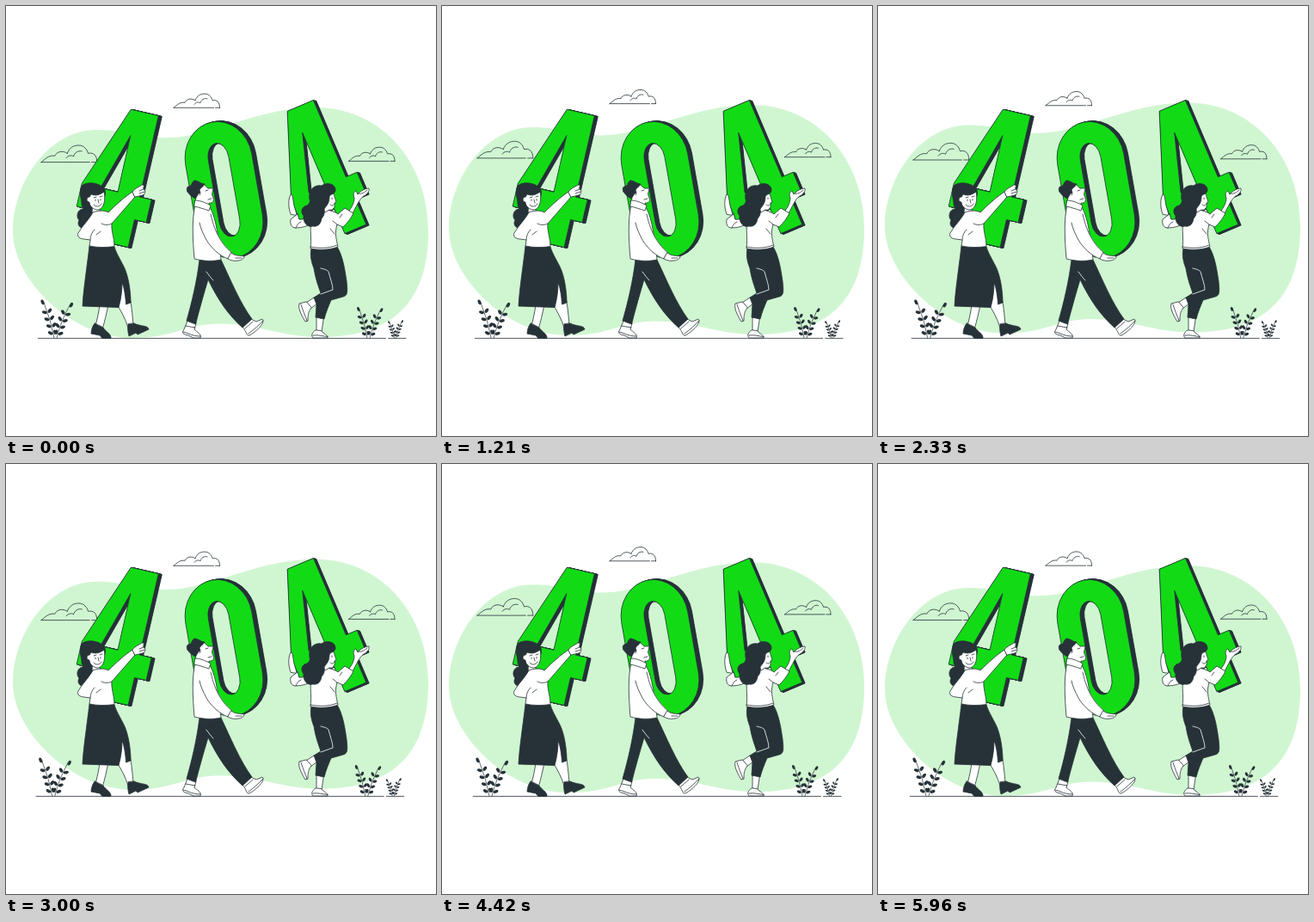
Recreate the animation shown at these times as an HTML page with a canvas. Size 500 px wide and 500 px high, loop 6 s.

```html
<!DOCTYPE html>
<html lang="en">
<head>
<meta charset="utf-8">
<title>404</title>
<style>
html, body { margin: 0; width: 100%; height: 100%; overflow: hidden; background: #fff; }
canvas { display: block; width: 500px; height: 500px; }
</style>
</head>
<body>
<canvas id="stage"></canvas>
<script>
const LOOP = 6000;
const GREEN = '#12db15', PALE = '#d0f6d1', DARK = '#263238', WHITE = '#fff';
const canvas = document.getElementById('stage');
const ctx = canvas.getContext('2d');
const dpr = window.devicePixelRatio || 1;
canvas.width = canvas.height = 500 * dpr;

const BLOB = new Path2D(`M8,262 C8,205 50,144 105,144 C150,144 170,160 215,150
  C265,139 305,118 360,118 C435,118 491,180 491,262 C491,338 456,385 365,385
  C320,385 295,369.500 248,369.500 C210,369.500 195,386 147,386 C76,386 8,318 8,262Z`);

const CLOUD = new Path2D(`M0,0 C4,-3 7,-7 13,-6 C15,-10.500 21,-11.500 25,-8.500
  M25,-8.500 C27,-14 31,-16.200 36,-16.200 C41,-16.200 44,-12.500 45,-8.500
  C50,-9.500 53.600,-7 53.500,0 M0,0 H46.500 M48.500,0 H53.500
  M24,-4 C26,-6.500 29,-7 31,-5.500 C32,-9 35,-11.500 39,-10.500`);

const FOUR = new Path2D(`M-32.500,0 L0,0 L0,97 L14,97 L14,124 L0,124 L0,157 L-27,157
  L-27,124 L-69,124 L-69,97Z M-26.500,30 L-47,97 L-26.500,97Z`);

const ZERO = new Path2D();
ZERO.roundRect(-39, -80, 78, 160, { x: 39, y: 44 });
ZERO.roundRect(-12, -55, 24, 110, { x: 12, y: 18 });

// [path, fill, stroke]
const people = [];
const add = (d, fill = WHITE, stroke = DARK) => people.push([new Path2D(d), fill, stroke]);
const line = (d, stroke = DARK) => add(d, null, stroke);

function womanWithSkirt() {
  add('M109,347 C108,356 106,364 104,372 L112,376 C115,366 117,357 119,347Z');
  add('M129,347 C134,355 139,364 142,374 L148,371 C147,360 146,345 142,330 L134,322Z');
  add('M103,369 C100,373 99,378 99,381 L109,383 L112,386.500 H122 C122.500,381 116,379 113,374Z', DARK);
  add('M142,370 C141,375 142,380 143,384 L151,380 L153,382 L166,376 C165,371 157,373 149,369Z', DARK);
  add('M97,279 C94,305 90,330 89,349 L131,350.500 C134,340 135,330 135,321 C138,330 139,338 139.500,347 L145,345 C145,330 142,313 137,303 C132,293 128,287 126,280Z', DARK);
  add('M99,236 C104,243 101,256 93,258 C86,260 82,254 85,249 C81,245 83,237 89,236 C92,233 96,233 99,236Z', DARK);
  add('M88,209 C95,203 109,206 114,212 C117,217 115,222 113,224 L99,236 C94,238 88,236 88,230 C88,224 84,217 88,209Z', DARK);
  add('M101,230 L100,240 C103,242 107,242 109,239 L109,232Z');
  add('M99,219 C104,221 109,220 114,216 C116,225 114,236 107,237 C101,237 97,232 97,228 C93,228 93,222 97,222Z');
  line('M104,225 v1.500 M110,224.500 v1.500 M107,225 L108,229 M102,231 C104,234 109,234 111,230 M102,223 L105,222 M109,222 L112,221');
  add('M101,240 C97,248 89,255 84,264 C82,268 86,271 91,271 L98,272 L97,279 C106,281 117,281 126,279.500 C126,270 122,260 123,253 L150,222 L147,216 C138,222 128,231 119,240 C114,237 106,238 101,240Z');
  line('M98,272 C98,267 100,263 103,260 M111,253 C115,255 119,255 123,253 M105,266 L110,262');
  add('M147,216 C149,212 154,211 158,208 L160,208 C161,210 159,212 160,213 C163,214 162,219 159,220 C156,221 153,221 150,222Z');
  line('M155,215 L160,213 M155,218 L161,216');
}

function man() {
  add('M211,366 L207,376 C204,380 206,382 212,383 L218,386 H226 C228,382 222,379 219,376 L221,369Z');
  line('M206,379 C212,380 216,384 226,384 M209,372 L220,374');
  add('M275,373 L285,364 L291,367 L298,364 C302,368 292,378 283,383 C279,384 280,378 275,373Z');
  line('M282,381 C289,376 294,371 299,366 M278,375 L287,367');
  add('M225,295 C222,320 216,345 210,366 L220.500,370 C225,352 230,335 235,318 C246,341 259,360 275,374 L286,364 C272,345 261,318 250,295Z', DARK);
  line('M233,309 C236,313 238,316 241,319', WHITE);
  add('M222,217 L220,228 L236,234 L236,229 C241,230 242,226 241,223 L239.500,219 L241,212 L235,212 L230,207Z');
  add('M211,216 C209,212 211,209 215,209 C217,204 219,202 220,203 C225,204 227,207 231,207 C229,211 226,211 225,214 L226,217 C223,218 222,222 220,224 C216,222 213,219 211,216Z', DARK);
  line('M232,215 L235,214 M235,225 L239,224 M223,217 C226,215 227,219 225,220');
  add('M220,231 C216,248 217,270 219,294 C231,297 241,297 250,295 C249,284 246,256 240,240 L237,234Z');
  add('M220,226 C226,226 233,229 238,232 L236,238 C230,236 224,234 219,233Z');
  add('M238,242 C241,255 244,263 249,271 C253,278 259,284 263,287 L258,294 C248,290 239,282 233,272 C229,264 225,255 224,246Z', WHITE, WHITE);
  line('M238,242 C241,255 244,263 249,271 C253,278 259,284 263,287 L258,294 C248,290 239,282 233,272 C229,264 226,258 225,252');
  add('M262,287 C267,291 272,290 277,291 C277,294 273,296 270,296 C266,297 261,296 258,294Z');
  line('M267,293 L274,293');
}

function womanWithTrousers() {
  add('M331,242 C328,234 328,225 331,219 L333,220 L334,226 C334,231 337,237 338,243Z');
  add('M339,242 L331,248 C330,254 332,258 337,258 C344,258 350,256 356,253 L356,243 C350,247 344,249 341,248Z');
  line('M337,258 C339,254 340,252 343,251');
  add('M361,360 L361,378 L367,379 L369.500,362Z');
  add('M360,377 C355,380 355,384 357,386 H374 C375,383 369,381 367,378Z');
  line('M357,383 C363,382 368,384 374,384.500');
  add('M358,339 L349,345 L354,352 L362,346Z');
  add('M349,344 L341,346 C339,352 345,362 348,367 L351,366 C351,361 351,356 355,351Z');
  line('M343,347 C345,354 348,360 350,366');
  add('M355,282 C353,291 356,300 358,305 C360,318 364,328 366,334 L358,339 L361,347 L360,362 L370,364 C372,356 375,349 378,342 L392,338 C398,337 397,330 396,320 C394,305 391,289 385,280Z', DARK);
  line('M366,305 C370,306 374,307 375,309 C377,317 380,324 380,330 L366,335', WHITE);
  add('M399,238 C402,234 405,229 405,223 C403,219 405,215 407,215 L409,219 C412,215 418,212 422,212 C423,215 420,219 416,221 C411,224 407,234 403,241Z');
  line('M410,218 C413,219 417,217 420,214');
  add('M356,239 C352,253 356,270 354,282 C364,284 376,284 386,280 C384,271 382,264 385,254 L392,257 C397,252 401,247 404,241 L394,235 L386,242 C380,237 365,235 356,239Z');
  line('M385,254 L380,250 M388,246 L391,242 M382,265 L377,259 M354,280 C364,282 376,282 385,278');
  add('M372,220 L381,218 L384,228 L382,229 C383,235 380,238 376,237 L371,240 L366,234Z');
  add('M353,224 C351,215 358,207 367,209 C373,204 384,207 383,215 C381,220 377,218 376,222 C376,229 373,232 370,236 C371,242 369,245 367,247 C366,254 362,257 357,256 C351,258 345,252 346,244 C342,239 344,233 350,232 C353,230 354,227 353,224Z', DARK);
  line('M379,223 v1.500 M377,231 C379,233 381,232 382,230');
}

womanWithSkirt();
man();
womanWithTrousers();

function drawDigit(path, x, y, angle, dx, dy) {
  const face = (ox, oy, fill) => {
    ctx.save();
    ctx.translate(x + ox, y + oy);
    ctx.rotate(angle * Math.PI / 180);
    ctx.fillStyle = fill;
    ctx.fill(path, 'evenodd');
    ctx.lineWidth = 0.7;
    ctx.stroke(path);
    ctx.restore();
  };
  const steps = 10;
  for (let i = steps; i > 0; i--) face(dx * i / steps, dy * i / steps, DARK);
  face(0, 0, GREEN);
}

function drawCloud(x, y, scale) {
  ctx.save();
  ctx.translate(x, y);
  ctx.scale(scale, scale);
  ctx.lineWidth = 0.8 / scale;
  ctx.stroke(CLOUD);
  ctx.restore();
}

function leaf(x, y, angle, size) {
  const reach = size * 1.3;
  ctx.beginPath();
  ctx.ellipse(x + Math.cos(angle) * reach, y + Math.sin(angle) * reach,
    size, size * 0.6, angle, 0, Math.PI * 2);
  ctx.fill();
}

// A stem that rises from its root, bends to the tip and bears pairs of leaves
function drawSprig(x, y, tipX, tipY, size) {
  const cx = x + (tipX - x) * 0.3, cy = y + (tipY - y) * 0.5;
  const mix = (a, b, c, t) => (1 - t) * (1 - t) * a + 2 * t * (1 - t) * b + t * t * c;
  ctx.lineWidth = 0.7;
  ctx.beginPath();
  ctx.moveTo(x, y);
  ctx.quadraticCurveTo(cx, cy, tipX, tipY);
  ctx.stroke();
  for (let t = 0.1; t < 0.85; t += 0.2) {
    const px = mix(x, cx, tipX, t), py = mix(y, cy, tipY, t);
    const dir = Math.atan2(mix(cy - y, (tipY - y) / 2, tipY - cy, t),
      mix(cx - x, (tipX - x) / 2, tipX - cx, t));
    leaf(px, py, dir - 0.95, size);
    leaf(px, py, dir + 0.95, size);
  }
  leaf(tipX, tipY + size, Math.atan2(tipY - cy, tipX - cx), size);
}

function drawGround() {
  ctx.lineWidth = 0.8;
  ctx.beginPath();
  ctx.moveTo(37.3, 386.4);
  ctx.lineTo(441.5, 386.4);
  ctx.moveTo(444.5, 386.4);
  ctx.lineTo(465, 386.4);
  ctx.stroke();
  drawSprig(56, 386, 44, 345, 3);
  drawSprig(59, 386, 74, 348, 3);
  drawSprig(420, 386, 411, 353, 2.6);
  drawSprig(423, 386, 435, 354, 2.6);
  drawSprig(451.5, 386, 446, 368, 1.6);
  drawSprig(453.5, 386, 460, 367, 1.6);
}

// 0 at both ends of the period, 1 in the middle
const swing = (t, period) => 1 - Math.abs(1 - 2 * (t % period) / period);

// Offsets at every tenth of the loop
const SHAKE = [0, -1, 2, -4, 4, -4, 4, -4, 2, -1, 0];
function shake(t) {
  const p = t / LOOP * 10, i = Math.floor(p);
  return (SHAKE[i] + (SHAKE[i + 1] - SHAKE[i]) * (p - i)) * 0.57;
}

function shifted(dx, dy, draw) {
  ctx.save();
  ctx.translate(dx, dy);
  draw();
  ctx.restore();
}

function render(t) {
  ctx.setTransform(dpr, 0, 0, dpr, 0, 0);
  ctx.fillStyle = WHITE;
  ctx.fillRect(0, 0, 500, 500);
  ctx.lineJoin = ctx.lineCap = 'round';
  ctx.strokeStyle = DARK;

  shifted(0, -7.2 * swing(t, LOOP), () => {
    ctx.fillStyle = PALE;
    ctx.fill(BLOB);
  });

  shifted(0, -5.8 * swing(t, LOOP / 2), () => {
    drawCloud(41, 181.6, 1.21);
    drawCloud(195, 118.3, 1);
    drawCloud(398.5, 180.4, 1);
  });

  ctx.fillStyle = DARK;
  shifted(shake(t), 0, drawGround);

  drawDigit(FOUR, 177.3, 127.6, 13, 4, 0.9);
  drawDigit(ZERO, 253.5, 213.8, -10, 4.8, -0.8);
  drawDigit(FOUR, 357.4, 109.5, -23, 3.4, 0.9);

  ctx.lineWidth = 0.8;
  for (const [path, fill, stroke] of people) {
    if (fill) {
      ctx.fillStyle = fill;
      ctx.fill(path);
    }
    ctx.strokeStyle = stroke;
    ctx.stroke(path);
  }
}

const start = performance.now();
function tick() {
  render((performance.now() - start) % LOOP);
  requestAnimationFrame(tick);
}
tick();
</script>
</body>
</html>
```
